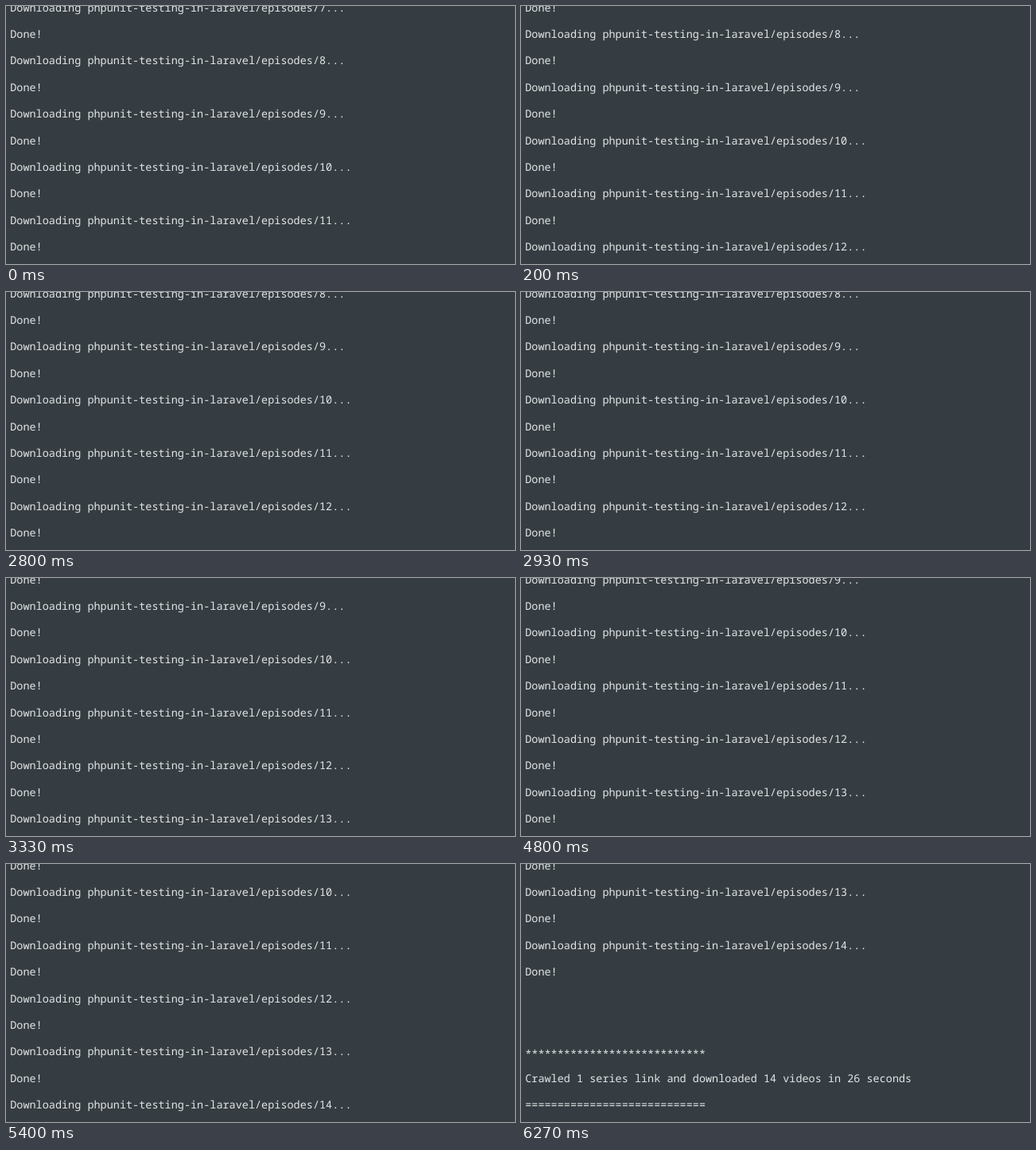
Write an HTML page that moves like this. It is 640 px wide and 324 px high and loops after 8070 ms.

```html
<!DOCTYPE html>
<html lang="en">
<head>
<meta charset="utf-8">
<title>Download log</title>
<style>
  html, body { margin: 0; width: 100%; height: 100%; overflow: hidden; background: #363d42; }
  #stage { position: relative; width: 640px; height: 324px; overflow: hidden; }
  #log {
    --row: 33.4px;
    --start: -14.4px;
    position: absolute;
    left: 5.2px;
    top: var(--start);
    color: #e2e5e6;
    font: 500 13.5px/33.4px "Noto Sans Mono", "DejaVu Sans Mono", monospace;
    font-variant-ligatures: none;
    text-rendering: geometricPrecision;
    white-space: pre;
    animation: scroll 8070ms step-end infinite;
  }
  #log div { height: var(--row); }
  #log .stars { position: relative; top: 2.5px; }

  /* The terminal jumps whole rows, without easing. */
  @keyframes scroll {
    0%      { top: var(--start); }
    2.478%  { top: calc(var(--start) - 1 * var(--row)); }
    34.696% { top: calc(var(--start) - 2 * var(--row)); }
    39.653% { top: calc(var(--start) - 3 * var(--row)); }
    59.479% { top: calc(var(--start) - 4 * var(--row)); }
    64.436% { top: calc(var(--start) - 5 * var(--row)); }
    77.695%, 100% { top: calc(var(--start) - 11 * var(--row)); }
  }
</style>
</head>
<body>
<div id="stage"><div id="log"></div></div>
<script>
  const log = document.getElementById('log');

  function addRow(text, className = '') {
    const row = document.createElement('div');
    row.textContent = text;
    row.className = className;
    log.append(row);
  }

  for (let episode = 7; episode <= 14; episode++) {
    addRow(`Downloading phpunit-testing-in-laravel/episodes/${episode}...`);
    addRow('Done!');
  }
  addRow('');
  addRow('');
  addRow('*'.repeat(28), 'stars');
  addRow('Crawled 1 series link and downloaded 14 videos in 26 seconds');
  addRow('='.repeat(28));
</script>
</body>
</html>
```
